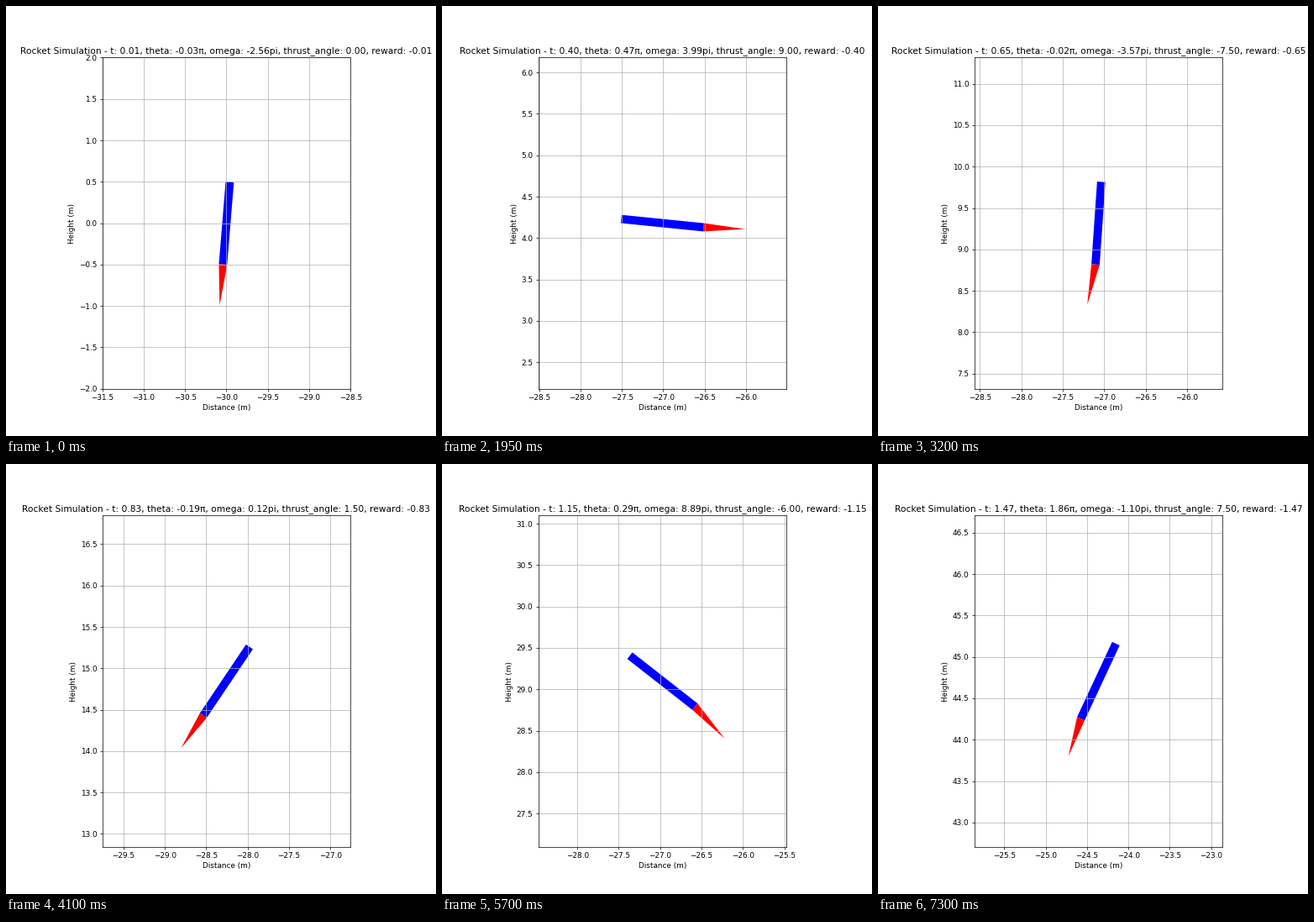
A matplotlib script that plays this animation: 512x512 px, repeating every 7350 ms.

```python
import matplotlib.pyplot as plt
import numpy as np
from matplotlib.animation import FuncAnimation
from numpy.polynomial import Polynomial

FRAMES, DT = 147, 0.01
LENGTH, WIDTH, FLAME = 1.0, 0.1, 0.5
TORQUE = 5.0  # angular acceleration, in pi/s^2 per degree of thrust angle

# Way points of the flight; theta and omega are in units of pi
KEYS = np.array([0, 25, 39, 64, 101, 128, 146])
THETA = np.array([-0.026, -0.177, 0.468, -0.022, -0.366, 1.453, 1.861])
OMEGA = np.array([-2.56, 3.51, 3.99, -3.57, 0.21, 6.00, -1.10])
GIMBAL = np.array([0, -4.5, 9, -7.5, -13.5, 7.5, 7.5])
POS = np.array([(-30, 0), (-28.738, 1.787), (-27.01, 4.18), (-27.07, 9.317),
                (-28.117, 22.607), (-26.37, 36.125), (-24.363, 44.707)])


def quintic(p, v, a):
    """Value, slope and curvature at every frame of a curve through KEYS."""
    out = np.zeros((3, FRAMES))
    for i in range(len(KEYS) - 1):
        n = np.arange(KEYS[i], KEYS[i + 1] + 1)
        h = (n[-1] - n[0]) * DT
        d = p[i + 1] - p[i]
        v0, v1 = v[i] * h, v[i + 1] * h
        a0, a1 = a[i] * h * h, a[i + 1] * h * h
        poly = Polynomial([
            p[i], v0, a0 / 2,
            10 * d - 6 * v0 - 4 * v1 - 1.5 * a0 + 0.5 * a1,
            -15 * d + 8 * v0 + 7 * v1 + 1.5 * a0 - a1,
            6 * d - 3 * v0 - 3 * v1 - 0.5 * a0 + 0.5 * a1])
        s = (n - n[0]) * DT / h
        for k in range(3):
            out[k, n] = (poly.deriv(k) if k else poly)(s) / h ** k
    return out


def fly(theta, gimbal):
    """Integrate thrust, side force and gravity, steered through POS."""
    along = np.stack([-np.sin(theta), np.cos(theta)], axis=1)
    side = np.stack([np.cos(theta), np.sin(theta)], axis=1)
    side = side * np.sin(gimbal)[:, None]
    down = np.tile([0.0, -1.0], (FRAMES, 1))
    force = np.stack([along, side, down])
    force[:, 0] = 0
    move = force.cumsum(axis=1).cumsum(axis=1) * DT ** 2
    goal = (POS - POS[0]).ravel()
    gain = np.linalg.lstsq(move[:, KEYS].reshape(3, -1).T, goal, rcond=None)[0]
    path = POS[0] + np.tensordot(gain, move, axes=1)

    rest = POS - path[KEYS]
    for k in range(2):
        slope = np.gradient(rest[:, k], KEYS * DT)
        slope[0] = 0
        path[:, k] += quintic(rest[:, k], slope, np.zeros(len(KEYS)))[0]
    return path


theta, omega, alpha = quintic(THETA, OMEGA, -TORQUE * GIMBAL)
gimbal = np.clip(np.round(-alpha / TORQUE / 1.5) * 1.5, -15, 15) + 0.0
path = fly(theta * np.pi, np.radians(gimbal))

fig, ax = plt.subplots(figsize=(8, 8), dpi=64)
ax.set_aspect("equal")
ax.set_xlabel("Distance (m)")
ax.set_ylabel("Height (m)")
ax.grid(True)
title = ax.set_title("")
body, = ax.fill([0, 0, 1, 1], [0, 1, 1, 0], color="blue", lw=0)
flame, = ax.fill([0, 1, 1], [0, 0, 1], color="red", lw=0)


def draw(n):
    x, y = path[n]
    th, tilt = theta[n] * np.pi, np.radians(gimbal[n])
    up = np.array([-np.sin(th), np.cos(th)]) * LENGTH / 2
    right = np.array([np.cos(th), np.sin(th)]) * WIDTH / 2
    base = path[n] - up
    left, far = base - right, base + right
    tip = (base[0] + FLAME * np.sin(th + tilt),
           left[1] - FLAME * np.cos(th + tilt))
    body.set_xy([left, far, far + 2 * up, left + 2 * up])
    flame.set_xy([left, far, tip])
    ax.set_xlim(x - 1.5, x + 1.5)
    ax.set_ylim(y - 2, y + 2)
    t = (n + 1) * DT
    title.set_text(f"Rocket Simulation - t: {t:.2f}, theta: {theta[n]:.2f}π, "
                   f"omega: {omega[n]:.2f}pi, thrust_angle: {gimbal[n]:.2f}, "
                   f"reward: {-t:.2f}")
    return body, flame, title


anim = FuncAnimation(fig, draw, frames=FRAMES, interval=50, repeat=True,
                     repeat_delay=0)
plt.show()
```
